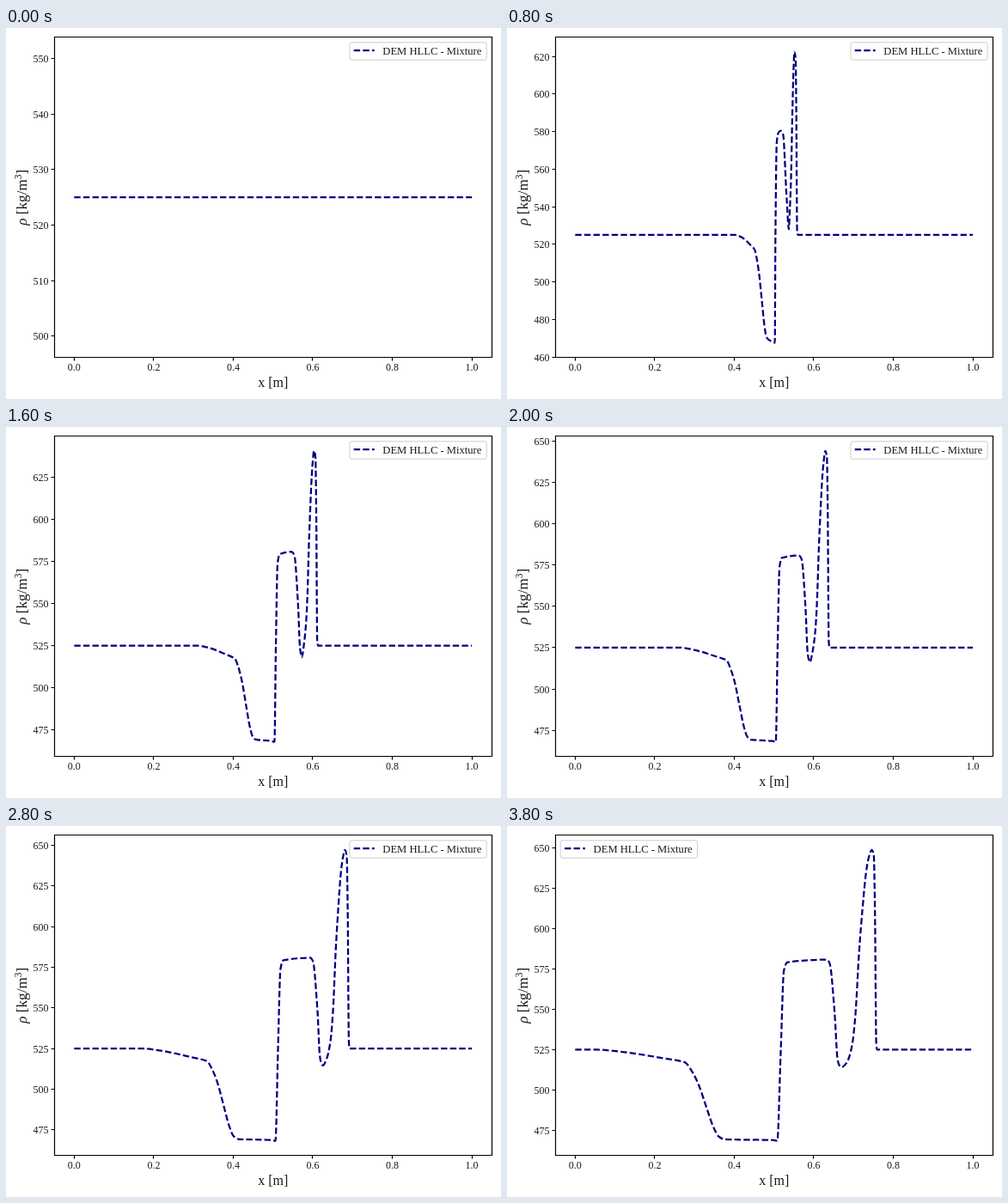
An HTML page that plays this animation: 576x432 px, repeating every 4 s.

```html
<!DOCTYPE html>
<html lang="en">
<head>
<meta charset="utf-8">
<title>Mixture density</title>
<style>
html, body { margin: 0; width: 100%; height: 100%; overflow: hidden; background: #fff; }
svg { display: block; width: 576px; height: 432px; }
text { font-family: "Liberation Serif", "Times New Roman", serif; font-size: 12px; fill: #1a1a1a; }
.axis { fill: none; stroke: #000; stroke-width: 1.2; }
.curve { fill: none; stroke: #000080; stroke-width: 2.25; stroke-dasharray: 7.4 3.2; stroke-linejoin: round; }
.mid { text-anchor: middle; }
.end { text-anchor: end; }
.label { font-size: 16px; }
</style>
</head>
<body>
<svg viewBox="0 0 576 432">
  <path id="line" class="curve"/>
  <path id="axes" class="axis"/>
  <g id="xticks"></g>
  <g id="yticks"></g>
  <text class="mid label" x="310.7" y="417.6">x [m]</text>
  <text id="ylabel" class="mid" style="font-size:17.2px"><tspan font-style="italic">ρ</tspan> [kg/m<tspan dy="-6" font-size="11.5">3</tspan><tspan dy="6">]</tspan></text>
  <g id="legend">
    <rect x="0" y="16.8" width="159.3" height="20.4" rx="2.4" fill="#fff" fill-opacity=".8" stroke="#ccc"/>
    <path class="curve" d="M4.8 26h24"/>
    <text x="38.4" y="30.5" style="font-size:12.6px">DEM HLLC - Mixture</text>
  </g>
</svg>
<script>
const STEP = 200, COUNT = 20;
const LEFT = 56.2, RIGHT = 565.2, TOP = 10.8, BOTTOM = 383.6;
const REST = 525;
// highest density at each step
const PEAK = [525, 578.8, 600.5, 613, 622.5, 629, 633.5, 637.3, 640.6, 642.6,
  644, 645.1, 646, 646.8, 647.3, 647.8, 648.2, 648.55, 648.8, 649.06];
// profiles between two points: [fraction of width, level]
const FAN = [[.13, 513.8], [.34, 505], [.6, 488], [.76, 477.5], [.92, 471], [1.08, 469.3]];
const RISE = [[.18, .01], [.35, .08], [.46, .22], [.585, .53], [.7, .74], [.81, .9], [.9, .97], [1, 1]];
const FALL = [[.45, .97], [.7, .7], [1, .03]];

const $ = id => document.getElementById(id);
const snap = v => Math.round(v - .5) + .5;
const xPos = x => LEFT + (RIGHT - LEFT) * (x + .05) / 1.1;
const lowest = k => 467.2 + .3 * Math.sqrt(Math.max(0, k - 3));

function profile(k) {
  if (!k) return [[0, REST], [1, REST]];
  const s = Math.sqrt(k), peak = PEAK[k], low = lowest(k), amp = peak - REST;
  const head = .5 - .0225 * k, kink = .498 - .0117 * k, tail = .5135 - .0076 * k;
  const drop = .4985 + .0081 * k, dip = .502 + .0088 * k;
  const top = .499 + .013 * k, shock = .505 + .01327 * k;
  const dipY = 514 + 14 * Math.exp(-.31 * (k - 4));
  const sharp = Math.exp(-k / 7); // early waves are still pointed
  const points = [
    [0, REST], [head - .004 * s, REST], [head + .2 * (kink - head), 523.8],
    [kink - .25 * (kink - head), 519.6], [kink, 517.2],
    ...FAN.map(([f, y]) => [kink + f * (tail - kink), y]),
    [.497, low + .5], [.5005 + .0004 * k, low],
    [.5 + .0009 * k, REST], [.502 + .0012 * k, 574], [.505 + .0015 * k, 579.3],
    [drop - .01 - .0022 * s, 581 - sharp], [drop - .0045 - .0018 * s, 578.5], [drop, 548],
    [drop + .42 * (dip - drop), dipY + 5 + 10 * sharp],
    [drop + .65 * (dip - drop), dipY + 1.2 + 6 * sharp], [dip, dipY],
    ...RISE.map(([f, g]) => [dip + f * (top - dip), dipY + (g + sharp * (f - g)) * (peak - dipY)]),
    ...FALL.map(([f, g]) => [top + f * (shock - top), REST + g * amp]),
    [shock + .002, REST], [1, REST]
  ];
  let last = -1;
  return points.map(([x, y]) => {
    last = Math.max(x, last + .0006);
    return [Math.min(last, 1), Math.min(y, peak)];
  });
}

// monotone cubic through the points
function smooth(p) {
  const n = p.length;
  const slope = i => (p[i + 1][1] - p[i][1]) / (p[i + 1][0] - p[i][0]);
  const tangent = p.map((_, i) => {
    if (i === 0 || i === n - 1) return 0;
    const a = slope(i - 1), b = slope(i);
    return a * b <= 0 ? 0 : 2 * a * b / (a + b);
  });
  let d = "M" + p[0].map(v => v.toFixed(2));
  for (let i = 1; i < n; i++) {
    const [x0, y0] = p[i - 1], [x1, y1] = p[i], h = (x1 - x0) / 3;
    const c = [x0 + h, y0 + h * tangent[i - 1], x1 - h, y1 - h * tangent[i], x1, y1];
    d += "C" + c.map(v => v.toFixed(2));
  }
  return d;
}

function draw(k) {
  const hi = PEAK[k], lo = k ? lowest(k) : REST;
  const pad = k ? .05 * (hi - lo) : REST * .055;
  const yMin = lo - pad, yMax = hi + pad;
  const gap = k === 0 ? 10 : k < 6 ? 20 : 25;
  let top = TOP;
  const yPos = y => BOTTOM - (BOTTOM - top) * (y - yMin) / (yMax - yMin);

  // a label close to the upper edge pushes the plot down
  const highest = Math.floor(yMax / gap) * gap;
  top += Math.max(0, TOP + 3.9 - yPos(highest));

  let axes = `M${snap(LEFT)} ${snap(top)}H${snap(RIGHT)}V${snap(BOTTOM)}H${snap(LEFT)}Z`;
  for (let i = 0; i < 6; i++) axes += `M${snap(xPos(i / 5))} ${snap(BOTTOM)}v4`;
  let labels = "";
  for (let v = Math.ceil(yMin / gap) * gap; v <= yMax; v += gap) {
    const y = snap(yPos(v));
    axes += `M${snap(LEFT)} ${y}h-4`;
    labels += `<text class="end" x="49.5" y="${y + 4}">${v}</text>`;
  }
  $("axes").setAttribute("d", axes);
  $("yticks").innerHTML = labels;
  $("line").setAttribute("d", smooth(profile(k).map(([x, y]) => [xPos(x), yPos(y)])));
  $("ylabel").setAttribute("transform", `translate(23.8 ${(top + BOTTOM) / 2}) rotate(-90)`);
  $("legend").setAttribute("transform", `translate(${k < 15 ? 399.9 : 62.2} 0)`);
}

$("xticks").innerHTML = [0, 1, 2, 3, 4, 5].map(i =>
  `<text class="mid" x="${xPos(i / 5)}" y="399.3">${(i / 5).toFixed(1)}</text>`).join("");

let shown = -1;
function tick() {
  const k = Math.floor(performance.now() / STEP) % COUNT;
  if (k !== shown) draw(shown = k);
  requestAnimationFrame(tick);
}
tick();
</script>
</body>
</html>
```
